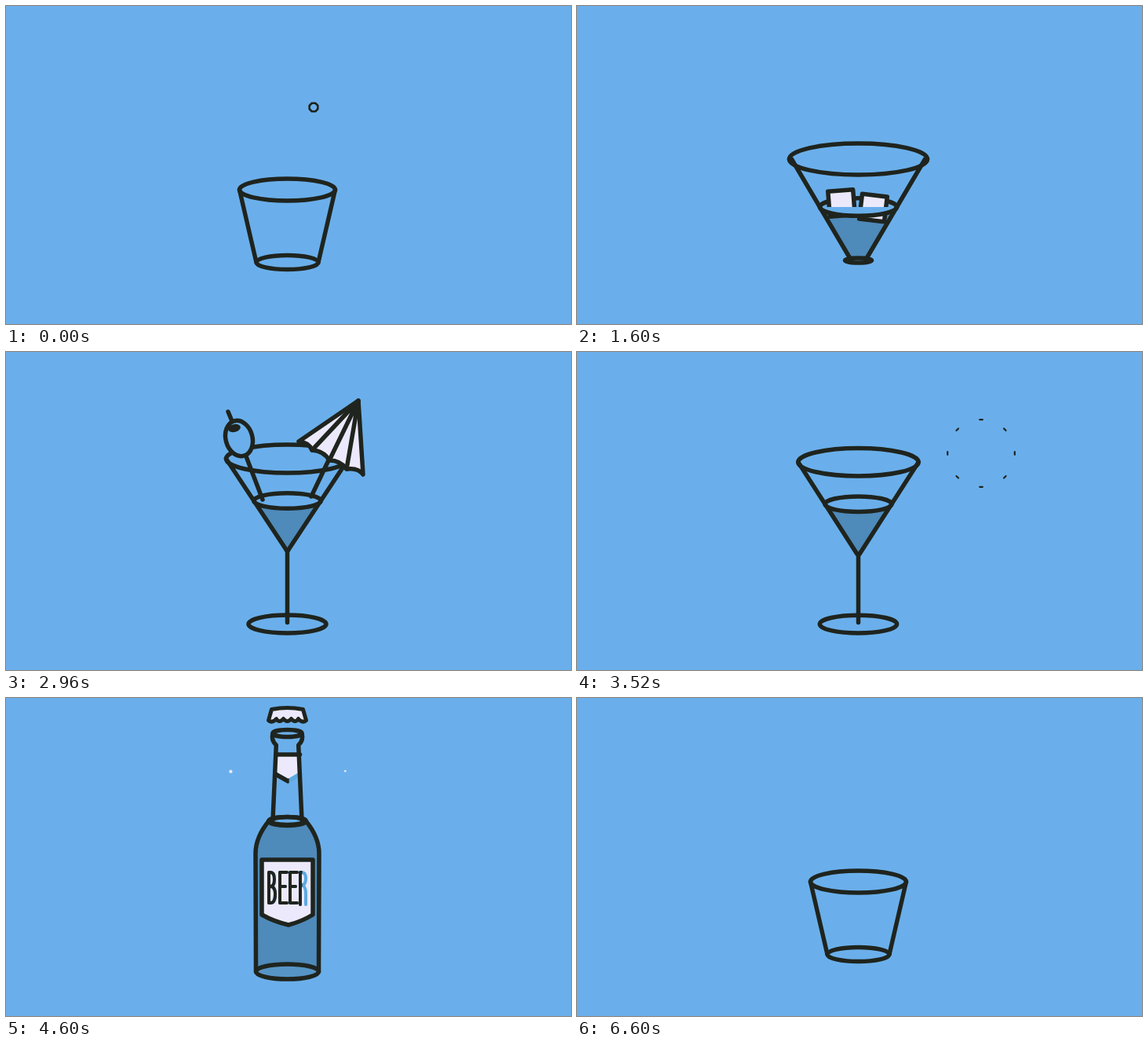
Write an HTML page with a canvas that moves like this. It is 720 by 405 pixels and loops after 6880 ms.

```html
<!DOCTYPE html>
<html lang="en">
<head>
<meta charset="utf-8">
<title>Drinks</title>
<style>
html, body { margin: 0; width: 100%; height: 100%; overflow: hidden; background: #6aafeb; }
canvas { display: block; width: 100vw; height: 100vh; }
</style>
</head>
<body>
<canvas id="stage" width="720" height="405" role="img" aria-label="A glass turning into a cocktail and a bottle of beer"></canvas>
<script>
const ctx = document.getElementById('stage').getContext('2d');
const LOOP = 6880, CX = 358.5;
const SKY = '#6aafeb', INK = '#1f241e', PAPER = '#ebe9fb', LIQUID = '#4e8aba', BOTTOM = '#5694c6', TINT = '#5ba9e2';

const clamp = v => Math.max(0, Math.min(1, v));
const mix = (a, b, k) => a + (b - a) * k;
const span = (t, a, b) => clamp((t - a) / (b - a));
const smooth = k => k * k * (3 - 2 * k);
const out = k => 1 - (1 - k) ** 3;
const back = k => 1 + 2.2 * (k - 1) ** 3 + 1.2 * (k - 1) ** 2;

// Vessel: rim y/rx/ry, shoulder y/rx, base y/rx/ry, foot y/rx/ry, neck height, lip
const TUMBLER = [234, 61, 14, 234, 61, 326.5, 39.5, 9, 326.5, 39.5, 9, 0, 0];
const CONE = [195, 88, 20, 195, 85, 324, 9, 2, 324, 17, 3, 0, 0];
const MARTINI = [136, 78, 18, 136, 78, 254, 0, 0, 346.5, 49.5, 11.5, 0, 0];
const SHORT = [255, 41, 9.5, 255, 41, 348.5, 40, 9.5, 348.5, 40, 9.5, 0, 0];
const BODY = [156.5, 23.5, 5, 198, 40.5, 348.5, 40, 9.5, 348.5, 40, 9.5, 0, 0];
const BOTTLE = [...BODY.slice(0, 11), 111.5, 1];
const CLOSING = [153, 21, 4.5, 198, 40.5, 348.5, 40, 9.5, 348.5, 40, 9.5, 93, 0];
const SHUT = [...CLOSING.slice(0, 11), 0, 0];

const poses = [
  [0, TUMBLER], [1360, TUMBLER], [1600, CONE], [1880, MARTINI], [3480, MARTINI],
  [3840, SHORT], [4040, SHORT], [4320, BODY], [4500, BOTTLE], [5780, BOTTLE],
  [5880, CLOSING], [6040, SHUT], [6440, TUMBLER], [LOOP, TUMBLER]
];
const levels = [
  [0, [327]], [160, [327]], [520, [278]], [1360, [278]], [1600, [256]], [1880, [189.5]],
  [3480, [189.5]], [3840, [305.5]], [4040, [305.5]], [4320, [157]], [5800, [157]],
  [5880, [153]], [6040, [153]], [6380, [327]], [LOOP, [327]]
];

function track(keys, t) {
  let i = 1;
  while (i < keys.length - 1 && t > keys[i][0]) i++;
  const [t0, a] = keys[i - 1], [t1, b] = keys[i];
  const k = smooth(span(t, t0, t1));
  return a.map((v, j) => mix(v, b[j], k));
}

function stroke(path, width = 5.5, color = INK) {
  ctx.lineWidth = width;
  ctx.strokeStyle = color;
  path ? ctx.stroke(path) : ctx.stroke();
}

function ring(y, rx, ry, from = 0, to = Math.PI * 2) {
  ctx.beginPath();
  ctx.ellipse(CX, y, Math.max(0, rx), Math.max(0, ry), 0, from, to);
}

function placed(x, y, angle, scale, alpha, draw) {
  if (alpha <= 0 || scale <= 0) return;
  ctx.save();
  ctx.globalAlpha = alpha;
  ctx.translate(x, y);
  ctx.rotate(angle);
  ctx.scale(scale, scale);
  draw();
  ctx.restore();
}

function halfWidth(p, y) {
  const [rimY, rimRx, , shY, shRx, baseY, baseRx] = p;
  if (y >= shY) return mix(shRx, baseRx, span(y, shY, baseY));
  const k = span(y, shY, rimY);
  return shRx - (shRx - rimRx) * k * k;
}

function liquid(p, y) {
  const rx = halfWidth(p, y), ry = rx * 0.23, [baseY, baseRx, baseRy] = p.slice(5, 8);
  ctx.beginPath();
  ctx.ellipse(CX, y, rx, ry, 0, Math.PI, 0, true);
  for (let i = 1; i <= 16; i++) {
    const yy = mix(y, baseY, i / 16);
    ctx.lineTo(CX + halfWidth(p, yy), yy);
  }
  ctx.ellipse(CX, baseY, baseRx, baseRy, 0, 0, Math.PI);
  for (let i = 15; i >= 0; i--) {
    const yy = mix(y, baseY, i / 16);
    ctx.lineTo(CX - halfWidth(p, yy), yy);
  }
  ctx.fillStyle = LIQUID;
  ctx.fill();
  if (baseRx > 25) {
    ring(baseY, baseRx, baseRy);
    ctx.fillStyle = BOTTOM;
    ctx.fill();
  }
  ring(y, rx, ry, Math.PI, 0);
  stroke();
  return () => {
    ring(y, rx, ry, 0, Math.PI);
    ctx.fillStyle = SKY;
    ctx.fill();
    stroke();
  };
}

function vessel(p) {
  const [rimY, rimRx, rimRy, shY, shRx, baseY, baseRx, , footY, footRx, footRy, neck, lip] = p;
  for (const s of [-1, 1]) {
    ctx.beginPath();
    ctx.moveTo(CX + s * baseRx, baseY);
    ctx.lineTo(CX + s * shRx, shY);
    ctx.quadraticCurveTo(CX + s * shRx, (shY + rimY) / 2, CX + s * rimRx, rimY);
    stroke();
  }
  if (footY - baseY > 1) {
    ctx.beginPath();
    ctx.moveTo(CX, baseY);
    ctx.lineTo(CX, footY - 2);
    stroke();
  }
  ring(footY, footRx, footRy);
  stroke();
  ring(rimY, rimRx, rimRy);
  stroke();
  if (neck < 2) return;
  const top = rimY - neck, open = clamp(neck / 30);
  for (const s of [-1, 1]) {
    ctx.beginPath();
    ctx.moveTo(CX + s * 18.5, rimY - 1);
    ctx.lineTo(CX + s * 14.2, Math.min(rimY, top + 4 + 11 * lip));
    if (lip > 0.1) ctx.quadraticCurveTo(CX + s * 21 * lip, top + 9 * lip, CX + s * 18.5, top);
    stroke();
  }
  ring(top, mix(rimRx, 18.5, open), 4.5);
  stroke();
}

function cubes(t, level) {
  const scale = 1 - smooth(span(t, 1640, 1800));
  [[337, -5, -0.08, 200], [377.5, 1, 0.12, 300]].forEach(([x, dy, angle, start], i) => {
    const k = span(t, start, start + 300);
    if (!k) return;
    const bob = 3 * Math.sin((t - start) / 130) * (1 - span(t, start + 300, 1500));
    const y = mix(-30, level + dy + (k === 1 ? bob : 0), k * k);
    placed(x, y, angle + (1 - k) * (i ? 1.5 : -1.5), scale, t < 1800 ? 1 : 0, () => {
      ctx.beginPath();
      ctx.rect(-16, -16, 32, 32);
      ctx.fillStyle = PAPER;
      ctx.fill();
      stroke();
    });
  });
}

const canopy = new Path2D('M449 62L373 114Q386 115 390 125Q405 126 412 138Q426 138 434 149Q449 147 455 156Z');
const ribs = new Path2D('M449 62L390 125M449 62L412 138M449 62L434 149M411 138L389 184');
const pick = new Path2D('M283 76L288 88M306 133L327 188');

function umbrella(t) {
  const i = back(span(t, 1760, 2120)), o = span(t, 2980, 3400) ** 2;
  if (t < 1760 || o === 1) return;
  const sway = 0.03 * Math.sin((t - 2120) / 110) * (1 - span(t, 2120, 2800)) * (t > 2120);
  placed(410 + 190 * (1 - i) + 215 * o, 140 - 210 * (1 - i) - 240 * o, 0.9 * (1 - i) + 1.3 * o + sway, 1, 1, () => {
    ctx.translate(-410, -140);
    ctx.fillStyle = PAPER;
    ctx.fill(canopy);
    stroke(ribs);
    stroke(canopy);
  });
}

function olive(t) {
  const i = back(span(t, 1680, 2040)), o = span(t, 3060, 3440) ** 2;
  if (t < 1680 || o === 1) return;
  const sway = 0.04 * Math.sin((t - 2040) / 110) * (1 - span(t, 2040, 2720)) * (t > 2040);
  placed(300 - 62 * (1 - i) - 70 * o, 115 - 220 * (1 - i) - 240 * o, -0.8 * (1 - i) - 1.1 * o + sway, 1, 1, () => {
    ctx.translate(-300, -115);
    stroke(pick);
    ctx.beginPath();
    ctx.ellipse(297, 110, 17, 23, -0.27, 0, 7);
    ctx.fillStyle = SKY;
    ctx.fill();
    stroke();
    ctx.beginPath();
    ctx.ellipse(291, 97, 8, 5, -0.25, 0, 7);
    ctx.fillStyle = INK;
    ctx.fill();
  });
}

const plate = new Path2D('M326 206H391V276Q376 285 360 289Q342 285 326 276Z');
const lettering = new Path2D('M335 222V261M335 222H337Q342 222 342 231Q342 240 337 240Q343 240 343 250Q343 261 337 261H335' +
  'M358 222H349V261H358M349 240H356M371 222H362V261H371M362 240H369' +
  'M375 263V222H377Q382 222 382 230Q382 238 377 238H375M377 238Q382 240 382 248V263');

// Draws a path tinted first, then inked up to x
function inkTo(path, x, width) {
  stroke(path, width, TINT);
  ctx.save();
  ctx.beginPath();
  ctx.rect(0, 0, x, 405);
  ctx.clip();
  stroke(path, width);
  ctx.restore();
}

function label(t) {
  ctx.fillStyle = PAPER;
  ctx.fill(plate);
  stroke(plate);
  if (t > 4440) inkTo(lettering, mix(330, 389, span(t, 4440, 4640)), 4);
}

const tilt = Math.atan2(1, 3), nx = Math.cos(tilt), ny = Math.sin(tilt);

function clipBefore(d) {
  ctx.rotate(tilt);
  ctx.beginPath();
  ctx.rect(-2000, -2000, 2000 + d, 4000);
  ctx.rotate(-tilt);
  ctx.clip();
}

function bottleLabel(t) {
  if (t < 4360 || t > 6000) return;
  if (t < 5680) {
    placed(358.5, 247, 0, back(span(t, 4360, 4540)), 1, () => {
      ctx.translate(-358.5, -247);
      label(t);
    });
    return;
  }
  // Peel: flat part before the fold, mirrored part folded over it
  const fold = 462 - 86 * (t - 5680) / 200, axis = fold + 18 * span(t, 5680, 5880);
  ctx.save();
  ctx.globalAlpha = 1 - span(t, 5890, 6000);
  clipBefore(fold);
  label(t);
  ctx.transform(1 - 2 * nx * nx, -2 * nx * ny, -2 * nx * ny, 1 - 2 * ny * ny, 2 * axis * nx, 2 * axis * ny);
  label(t);
  ctx.restore();
}

const shield = new Path2D('M-15-17H15L16.5 8L0 17L-16.5 8Z');
const shieldTop = new Path2D('M-15-17H15');
const shieldTip = new Path2D('M-16 8L0 17L15 8');

function neckLabel(t) {
  if (t < 4420 || t > 5910) return;
  const k = Math.max(0, (t - 5490) / 390);
  placed(mix(359.5, 556, k), mix(89, -4, k), 0.13 * k, back(span(t, 4420, 4540)), clamp(1 - 0.85 * k ** 1.5), () => {
    ctx.fillStyle = PAPER;
    ctx.fill(shield);
    if (k > 0) return stroke(shield);
    stroke(shieldTop);
    ctx.translate(-360, 0);
    const tip = new Path2D();
    tip.addPath(shieldTip, new DOMMatrix([1, 0, 0, 1, 360, 0]));
    inkTo(tip, mix(343, 379, span(t, 4520, 4680)), 5.5);
  });
}

const capPath = new Path2D('M-20-6Q0-10 20-6L24 8Q19 12 14 6Q10 12 5 6Q0 12-5 6Q-10 12-14 6Q-19 12-24 8Z');

function cap(t) {
  if (t < 4480 || t > 5420) return;
  const y = t < 4600 ? mix(-20, 20, span(t, 4480, 4600)) : mix(20, 41, out(span(t, 4600, 4720)));
  const o = span(t, 5080, 5420);
  placed(CX + 60 * o, y - 90 * out(o), 1.6 * o, 1, 1, () => {
    ctx.fillStyle = PAPER;
    ctx.fill(capPath);
    stroke(capPath, 5);
  });
}

function dot(t, start, side) {
  const k = span(t, start, start + 240);
  if (k <= 0 || k >= 1) return;
  ctx.beginPath();
  ctx.arc(CX + side * mix(20, 74, out(k)), mix(112, 93, out(k)), 4 * (1 - k) + 0.8, 0, 7);
  ctx.fillStyle = PAPER;
  ctx.fill();
}

// Eight tangential dashes spreading from a point
function burst(t, start, x, y, reach) {
  const k = (t - start) / 480;
  if (k < 0 || k >= 1) return;
  const r = mix(5, reach, out(k));
  for (let i = 0; i < 8; i++) {
    placed(x, y, i * Math.PI / 4, 1, 1, () => {
      ctx.beginPath();
      ctx.moveTo(r, -1.8);
      ctx.lineTo(r, 1.8);
      stroke(null, mix(2.6, 1, k));
    });
  }
}

function draw(t) {
  ctx.fillStyle = SKY;
  ctx.fillRect(0, 0, 720, 405);
  ctx.lineCap = ctx.lineJoin = 'round';
  const p = track(poses, t), [raw] = track(levels, t);
  const level = Math.max(raw, p[0]);
  const front = p[5] - level > 2 ? liquid(p, level) : null;
  cubes(t, level);
  if (front) front();
  bottleLabel(t);
  if (t < 5490) neckLabel(t);
  vessel(p);
  if (t >= 5490) neckLabel(t);
  olive(t);
  umbrella(t);
  cap(t);
  dot(t, 4400, 1);
  dot(t, 4440, -1);
  burst(t, 0, 392, 129, 56);
  burst(t, 2200, 181, 129, 66);
  burst(t, 2340, 550, 129, 67);
  burst(t, 3400, 515, 129, 70);
  burst(t, 5430, 195, 129, 74);
}

const begin = performance.now();
function tick() {
  draw((performance.now() - begin) % LOOP);
  requestAnimationFrame(tick);
}
tick();
</script>
</body>
</html>
```
